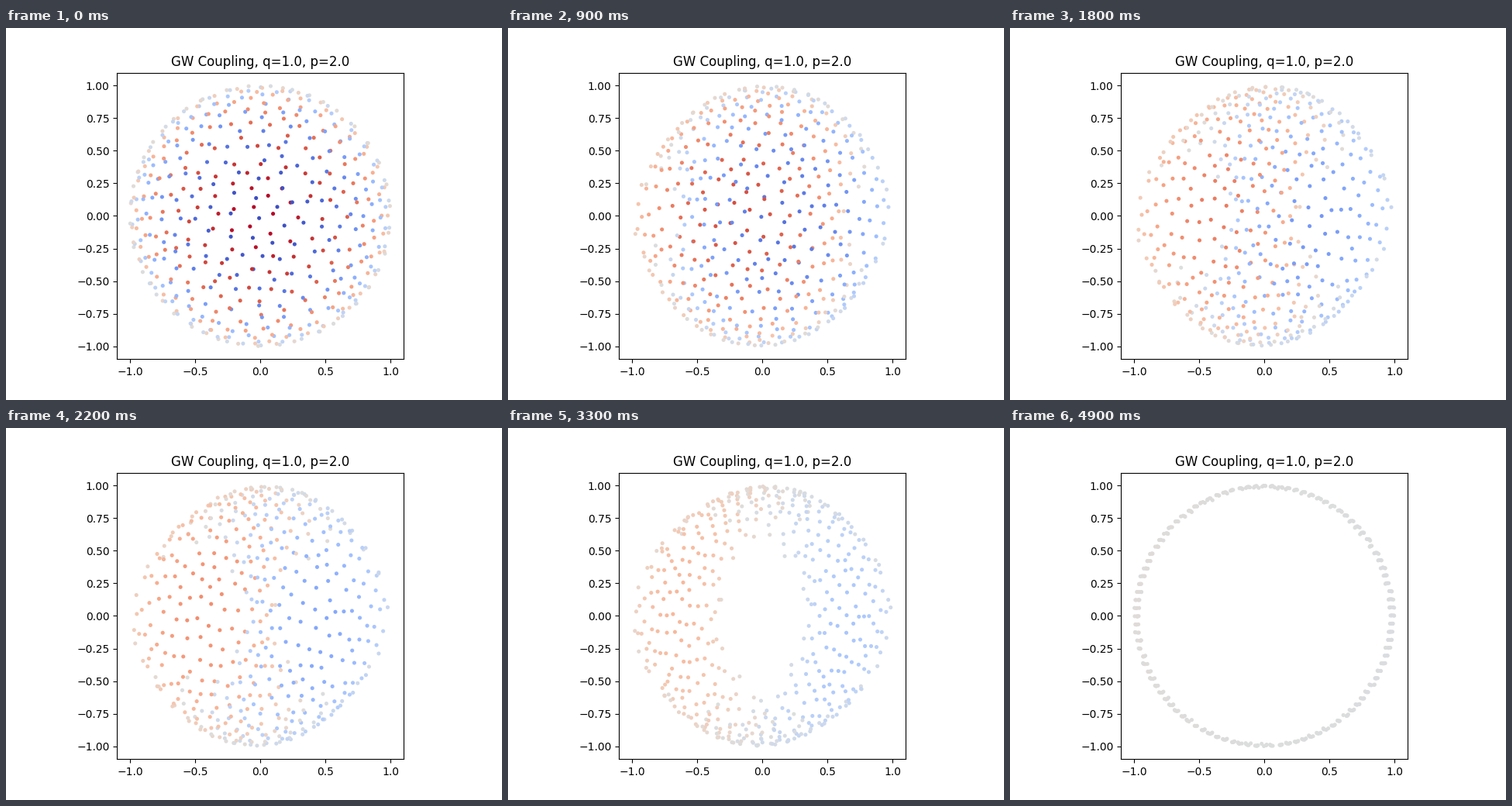
Animation of 640x480 px, one loop 5000 ms. Source, as a matplotlib script:

```python
import numpy as np
import matplotlib.pyplot as plt
from matplotlib.animation import FuncAnimation

N_SPHERE, N_CIRCLE = 500, 100
FRAMES, INTERVAL = 50, 100
TWIST = 0.2  # rotation of the coupled circle, radians

plt.rcParams["text.kerning_factor"] = 6


def farthest_points(total, rng):
    """Spread points evenly over the unit sphere by farthest point sampling."""
    cloud = rng.normal(size=(20000, 3))
    cloud /= np.linalg.norm(cloud, axis=1, keepdims=True)
    chosen = [cloud[0]]
    closeness = cloud @ cloud[0]
    while len(chosen) < total:
        pick = cloud[closeness.argmin()]
        chosen.append(pick)
        closeness = np.maximum(closeness, cloud @ pick)
    return np.array(chosen)


def couple(points):
    """Match equal shares of the sphere points to evenly spaced circle points."""
    angle = np.arctan2(points[:, 1], -points[:, 2]) - TWIST
    order = np.argsort((angle + np.pi / N_CIRCLE) % (2 * np.pi))
    slot = np.empty(len(points), dtype=int)
    slot[order] = np.arange(len(points)) * N_CIRCLE // len(points)
    angle = 2 * np.pi * slot / N_CIRCLE
    return np.column_stack([np.cos(angle), np.sin(angle), np.zeros(len(points))])


sphere = farthest_points(N_SPHERE, np.random.default_rng(4))
circle = couple(sphere)

fig, ax = plt.subplots(figsize=(6.4, 4.8), dpi=100)
ax.set_aspect("equal")
ax.set(xlim=(-1.1, 1.099), ylim=(-1.099, 1.1),
       xticks=np.linspace(-1, 1, 5), yticks=np.linspace(-1, 1, 9))
ax.set_title("GW Coupling, q=1.0, p=2.0")
dots = ax.scatter(sphere[:, 0], sphere[:, 1], c=sphere[:, 2], s=7,
                  cmap="coolwarm", vmin=-1, vmax=1)


def update(frame):
    t = frame / FRAMES
    points = (1 - t) * sphere + t * circle
    dots.set_offsets(points[:, :2])
    dots.set_array(points[:, 2])
    return (dots,)


anim = FuncAnimation(fig, update, frames=FRAMES, interval=INTERVAL,
                     repeat=True, repeat_delay=0)
plt.show()
```
